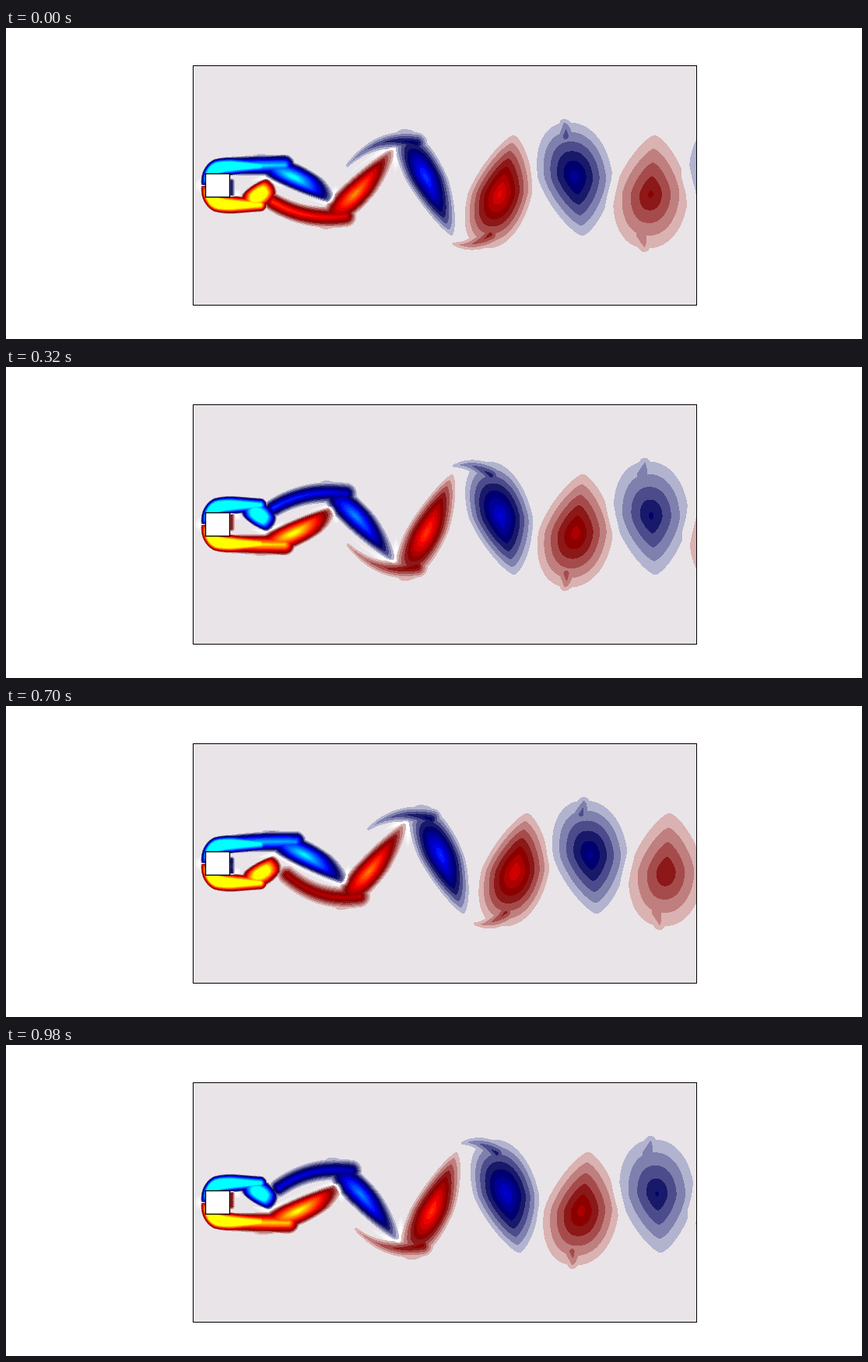
Recreate the animation shown at these times as an HTML page with a canvas. Size 1100 px wide and 400 px high, loop 1 s.

```html
<!DOCTYPE html>
<html lang="en">
<head>
<meta charset="utf-8">
<title>Vortex street behind a square</title>
<style>
html, body { margin: 0; width: 100%; height: 100%; overflow: hidden; background: #fff; }
canvas { display: block; width: 1100px; height: 400px; }
</style>
</head>
<body>
<canvas id="stage" width="1100" height="400"></canvas>
<script>
const LOOP = 1000, STEP = 20, PERIOD = 636;
const LEFT = 241, TOP = 110, W = 646, H = 184, MIRROR = 404;
const HALO = 7, HALO_END = 530;
const GROUND = [233, 228, 232];

const ctx = document.getElementById('stage').getContext('2d');
const image = ctx.createImageData(W, H);
const newLayer = () => ({ value: new Float32Array(W * H), gap: new Float32Array(W * H) });
const warm = newLayer(), cold = newLayer();

const clamp = (v, lo, hi) => Math.max(lo, Math.min(hi, v));
const mix = (a, b, t) => a + (b - a) * t;
const ramp = (v, from, to) => clamp((v - from) / (to - from), 0, 1);
const smooth = (v, from, to) => { const t = ramp(v, from, to); return t * t * (3 - 2 * t); };
const bezier = (a, b, c, t) => mix(mix(a, b, t), mix(b, c, t), t);

// Raises a layer inside a box. distance(dx, dy) is 0 at the centre
// and 1 on the outer contour, where the level is 1.
function raise(layer, x, y, halfW, halfH, radius, peak, distance) {
  const slope = Math.max(peak - 1, 0.6);
  const x0 = Math.max(0, Math.ceil(x - halfW - LEFT)), x1 = Math.min(W - 1, Math.floor(x + halfW - LEFT));
  const y0 = Math.max(0, Math.ceil(y - halfH - TOP)), y1 = Math.min(H - 1, Math.floor(y + halfH - TOP));
  for (let py = y0; py <= y1; py++) {
    for (let px = x0; px <= x1; px++) {
      const i = py * W + px, q = distance(px + LEFT - x, py + TOP - y);
      layer.value[i] = Math.max(layer.value[i], peak - slope * q);
      layer.gap[i] = Math.min(layer.gap[i], (q - 1) * radius);
    }
  }
}

// A soft stroke: at(t) gives x, y, radius and peak for t from 0 to 1.
function ribbon(layer, at, steps) {
  for (let s = 0; s <= steps; s++) {
    const [x, y, radius, peak] = at(s / steps), reach = radius + HALO;
    raise(layer, x, layer.flip ? MIRROR - y : y, reach, reach, radius, peak,
      (dx, dy) => Math.sqrt(dx * dx + dy * dy) / radius);
  }
}

// Shear layer leaving the front corner and running along the square
function sheet(layer) {
  ribbon(layer, t => [
    254 + 72 * t ** 1.4,
    204 + 23 * (1 - (1 - t) ** 5),
    mix(4, 12, ramp(t, 0, 0.35)) - 3 * ramp(t, 0.6, 1),
    mix(12, 36, ramp(t, 0, 0.3)) - 14 * ramp(t, 0.4, 1),
  ], 40);
}

function vortexAt(age) {
  const grown = ramp(age, -220, 0), a = Math.max(age, 0);
  const lean = 1.5 * ramp(age, -150, 340) * Math.exp(-Math.max(0, age - 340) / 500);
  return {
    x: 243 + 0.3066 * a + 82 * Math.exp(-a / 300),
    y: 213 + 12 * (1 - grown),
    lean,
    width: grown * (20 * Math.hypot(1, lean) + 28 * smooth(age, 700, 1560)),
    up: grown * (20 + 56 * smooth(age, 0, 1000)),
    down: grown * (22 + 48 * smooth(age, 0, 1300)),
    peak: 21.5 * Math.exp(-a / 1360) + 10 * Math.exp(-a / 250),
  };
}

// Leaning drop: pointed towards the tip, round towards the belly
function body(layer, v) {
  const sign = layer.flip ? -1 : 1;
  const halfH = Math.max(v.up, v.down) + HALO;
  raise(layer, v.x, layer.flip ? MIRROR - v.y : v.y,
    v.width + HALO + v.lean * halfH, halfH, v.width, v.peak, (dx, dy) => {
      const down = dy * sign, power = down > 0 ? 2.2 : 1.4;
      const across = Math.abs(dx + v.lean * down) / v.width;
      const along = Math.abs(down) / (down > 0 ? v.down : v.up);
      return (across ** power + along ** power) ** (1 / power);
    });
}

// Tail: tied to the next vortex upstream, then torn off and drawn in
function tail(layer, v, age) {
  const reach = 105 - 95 * ramp(age, 920, 1650);
  const drop = 14 - 22 * ramp(age, 600, 820) + 80 * (1 - Math.exp(-Math.max(0, age - 900) / 160));
  const sag = ramp(age, 340, 1150);
  const endX = Math.max(290, v.x - reach), endY = v.y + drop;
  const bendX = mix(v.x, endX, 0.6), bendY = v.y + mix(15, 70, sag);
  const rootX = v.x - 12, rootY = v.y + mix(15, 52, sag);
  const endRadius = mix(12, 2, ramp(age, 720, 960));
  const endPeak = Math.min(0.95 * v.peak, 1.6 + 9.4 * Math.exp((636 - age) / 110));
  const rootPeak = v.peak * mix(0.85, 0.55, ramp(age, 340, 700));
  ribbon(layer, t => [
    bezier(endX, bendX, rootX, t),
    bezier(endY, bendY, rootY, t),
    mix(endRadius, 14, t),
    mix(endPeak, rootPeak, t),
  ], 40);
}

function fillLayer(layer, time, flip) {
  layer.value.fill(0);
  layer.gap.fill(99);
  layer.flip = flip;
  const phase = time % PERIOD;
  sheet(layer);
  for (let age = phase - PERIOD; age < 2400; age += PERIOD) {
    if (age < -200) continue;
    const vortex = vortexAt(age);
    body(layer, vortex);
    if (age > 150) tail(layer, vortex, age);
  }
  // Thin layer on the rear face of the square
  const rear = 6 * Math.cos(2 * Math.PI * (phase - 360) / PERIOD);
  if (rear > 1) ribbon(layer, t => [289.5, 190 + 17 * t, 4, rear], 8);
}

function levelColour(level, isWarm) {
  const k = level - 1;
  if (level < 5) {
    return isWarm ? [217 - 25.7 * k, 178 - 51.3 * k, 177 - 51 * k]
                  : [178 - 51 * k, 179 - 51.3 * k, 207 - 33.7 * k];
  }
  const main = level < 9 ? (isWarm ? 140 + 33 * (level - 5) : 112 + 38 * (level - 5)) : 255;
  const green = level < 9 ? 0 : Math.min(255, 20 + 28 * (level - 9));
  return isWarm ? [main, green, 0] : [0, green, main];
}

const palette = [true, false].map(isWarm =>
  Array.from({ length: 19 }, (_, l) => l ? levelColour(l, isWarm) : GROUND));

function draw(time) {
  fillLayer(warm, time, false);
  fillLayer(cold, time + PERIOD / 2, true);
  const out = image.data;
  for (let i = 0; i < W * H; i++) {
    const v = warm.value[i] - cold.value[i];
    const level = Math.min(18, Math.floor(Math.abs(v)));
    const colour = palette[v > 0 ? 0 : 1][level];
    let white = 0;
    if (!level && i % W + LEFT < HALO_END) {
      white = clamp(1.4 - Math.max(warm.gap[i], cold.gap[i]) / HALO, 0, 1);
    }
    for (let c = 0; c < 3; c++) out[4 * i + c] = mix(colour[c], 255, white);
    out[4 * i + 3] = 255;
  }
  ctx.fillStyle = '#fff';
  ctx.fillRect(0, 0, 1100, 400);
  ctx.fillStyle = `rgb(${GROUND})`;
  ctx.fillRect(240, 48, 648, 309);
  ctx.putImageData(image, LEFT, TOP);
  ctx.strokeStyle = '#000';
  ctx.lineWidth = 1;
  ctx.strokeRect(240.5, 48.5, 647, 308);
  ctx.fillStyle = '#fff';
  ctx.fillRect(256, 187, 32, 31);
  ctx.lineWidth = 1.4;
  ctx.strokeRect(256.5, 187.5, 31, 30);
}

const start = performance.now();
let shown = -1;
function tick() {
  const time = Math.floor((performance.now() - start) % LOOP / STEP) * STEP;
  if (time !== shown) draw(shown = time);
  requestAnimationFrame(tick);
}
tick();
</script>
</body>
</html>
```
